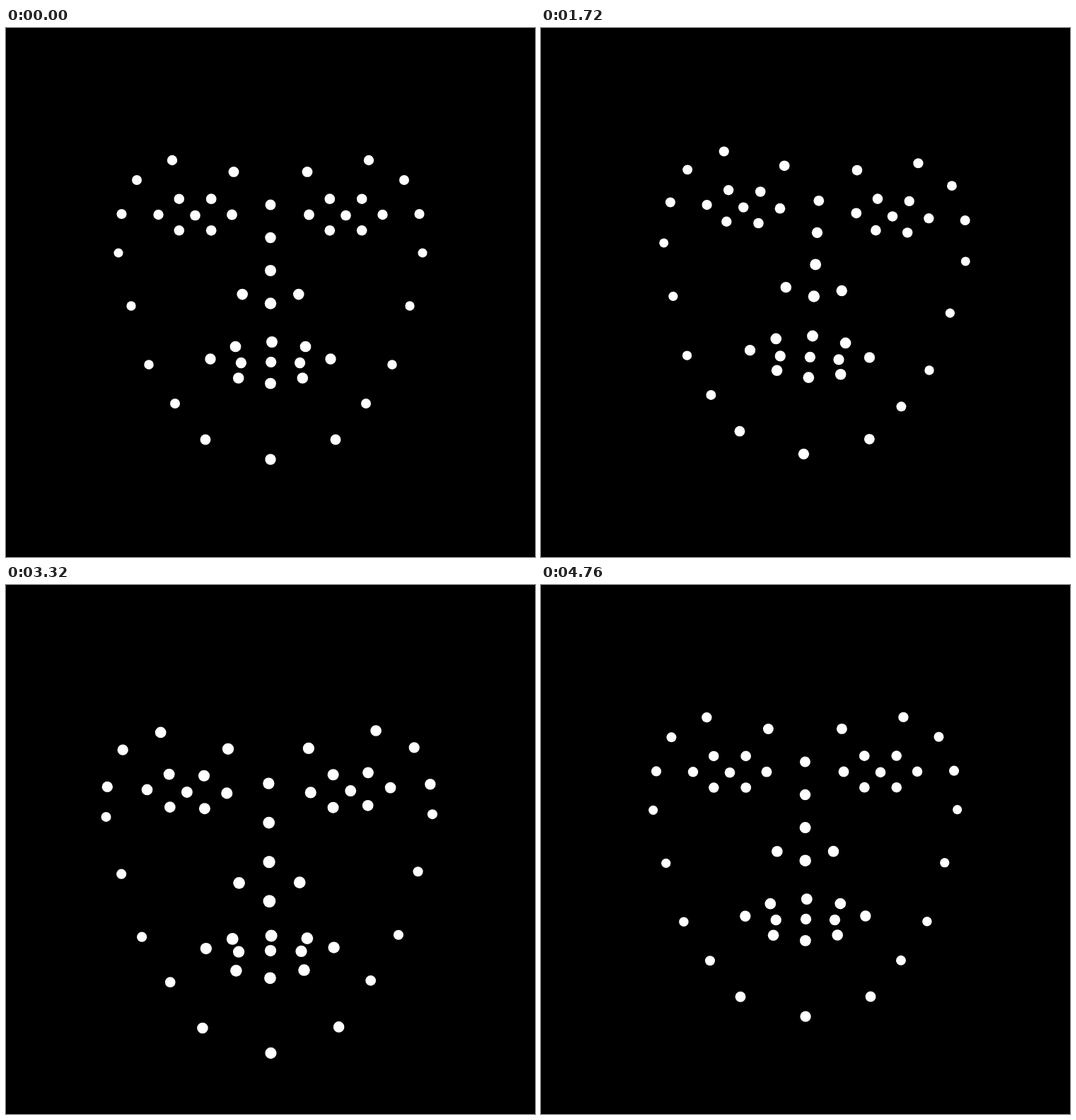
These frames come from a looping animation (748x748 px, 4800 ms). An HTML page with a canvas:

```html
<!DOCTYPE html>
<html lang="en">
<head>
<meta charset="utf-8">
<title>Dot face</title>
<style>
  html, body { margin: 0; height: 100%; overflow: hidden; background: #000; }
  canvas { display: block; width: 100vw; height: 100vh; }
</style>
</head>
<body>
<canvas width="748" height="748"></canvas>
<script>
const ctx = document.querySelector('canvas').getContext('2d');
const CENTER = 374, LOOP = 4800, STEP = 40;

// Points are [x, y, depth], measured from the middle of the stage.
const halfOutline = [
  [139, -187, 17], [189, -159, 13.5], [210.5, -111, 15], [215, -56, 4.5], [197, 19, 6.5],
  [172, 102, 8.5], [135, 157, 13.5], [92, 208, 22], [52, -170.6, 22]
];
const nostril = [39.8, 2.6, 28.5];
const halfMouth = [[85, 94, 26.5], [49.5, 76.5, 30], [45.3, 121, 29], [41.6, 99.5, 26]];
const middle = [[0, 236, 27], [2, 70, 32], [0.7, 98.3, 26], [0, 128.7, 31]];

const halfEye = [[0, 1]];
for (const side of [-1, 1])
  halfEye.push([side * 52, 0], [side * 22.7, 22.3], [side * 22.7, -22.3]);
const eye = halfEye.map(([x, y]) => [106.5 + x, y - 110, 19.5 - .04 * x]);

const bridge = [0, 1, 2, 3].map(i => [0, 46.5 * i - 124, 22.5 + 5 * i]);
const mirrored = [...halfOutline, ...eye, nostril, ...halfMouth]
  .flatMap(([x, y, depth]) => [[x, y, depth], [-x, y, depth]]);
const points = [...mirrored, ...bridge, ...middle];

// Motion curves as [time, amount].
const nodKeys = [
  [0, 0], [440, -.52], [1240, -1.265], [1720, -.265], [2240, -.25], [2700, 0],
  [2880, .4], [3440, 1.5], [3800, 1.4], [4400, .25], [LOOP, 0]
];
const tiltKeys = [
  [0, 0], [440, -.006], [1200, .061], [1720, .061], [2240, .012],
  [2880, -.0127], [3800, -.003], [4020, -.085], [4320, -.085], [LOOP, 0]
];
const smirkKeys = [[0, 0], [440, 1], [1120, 0], [LOOP, 0]];

// Monotone cubic: smooth through the keys, flat at every extreme.
function curve(keys, t) {
  const slope = i => keys[i] && keys[i + 1]
    ? (keys[i + 1][1] - keys[i][1]) / (keys[i + 1][0] - keys[i][0]) : 0;
  const tangent = i => {
    const a = slope(i - 1), b = slope(i);
    return a * b <= 0 ? 0 : 2 * a * b / (a + b);
  };
  const i = keys.findLastIndex(key => key[0] <= t);
  const [t0, v0] = keys[i], [t1, v1] = keys[i + 1];
  const u = (t - t0) / (t1 - t0), v = 1 - u;
  return v0 * v * v * (1 + 2 * u) + v1 * u * u * (3 - 2 * u)
    + (t1 - t0) * u * v * (v * tangent(i) - u * tangent(i + 1));
}

// Soft influence of a muscle on the skin around it.
const near = (x, y, cx, cy, reach) =>
  Math.exp(-((x - cx) ** 2 + (y - cy) ** 2) / reach ** 2);

function draw(t) {
  const nod = curve(nodKeys, t), tilt = curve(tiltKeys, t), smirk = curve(smirkKeys, t);
  const scale = 1 + .027 * nod + .013 * nod * nod;
  const drop = 2 * Math.max(0, nod) ** 2;
  ctx.fillStyle = '#000';
  ctx.fillRect(0, 0, 748, 748);
  ctx.fillStyle = '#fff';
  for (const [x, y, depth] of points) {
    const size = scale + nod * (.0003 * depth - .00009 * y);
    const jaw = smirk * near(x, y, 95, 150, 95);
    const brow = smirk * near(x, y, 150, -190, 50);
    const sx = size * (x - tilt * y) + tilt * (150 + 1.6 * depth) + 11 * jaw - 16 * brow;
    const sy = (scale - .016 * nod) * y + size * tilt * x + nod * depth + drop
      - 16 * jaw - 9 * brow;
    ctx.beginPath();
    ctx.arc(CENTER + sx, CENTER + sy, (6.3 + .052 * depth) * size, 0, 2 * Math.PI);
    ctx.fill();
  }
}

const start = performance.now();
function tick() {
  const t = (performance.now() - start) % LOOP;
  draw(Math.floor(t / STEP) * STEP);
  requestAnimationFrame(tick);
}
tick();
</script>
</body>
</html>
```
